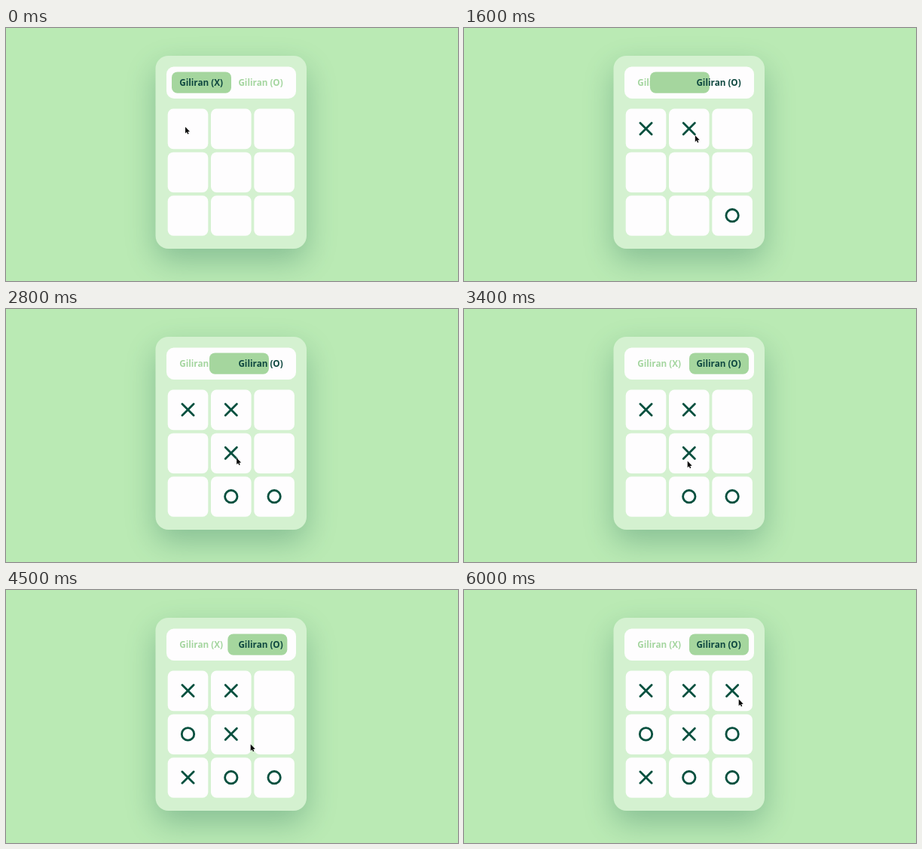
Animation, 600 px wide and 337 px high, one loop 6.1 s. Source, as an HTML page:

```html
<!DOCTYPE html>
<html lang="id">
<head>
<meta charset="utf-8">
<title>Giliran</title>
<style>
  html, body { margin: 0; width: 100%; height: 100%; overflow: hidden; background: #baeab4; }
  svg { display: block; width: 100%; height: 100%; }
  text { font: 700 11.7px "Open Sans", "Noto Sans", sans-serif; fill: #a5d6a0; }
  text.on { fill: #0f4840; }
  .mark { fill: none; stroke: #07503f; stroke-width: 2.8; stroke-linecap: round; }
  .white { fill: #fefdfe; }
</style>
</head>
<body>
<svg id="stage" viewBox="0 0 600 337">
  <defs>
    <filter id="blur" x="-50%" y="-50%" width="200%" height="200%">
      <feGaussianBlur stdDeviation="21"/>
    </filter>
  </defs>
  <rect width="600" height="337" fill="#baeab4"/>
  <rect x="198.5" y="53" width="200.5" height="257" rx="17" fill="#004d40" opacity=".28" filter="url(#blur)"/>
  <rect x="198.5" y="37" width="200.5" height="257" rx="17" fill="#d4f1d0"/>
  <rect class="white" x="213" y="51.5" width="172" height="42.5" rx="10"/>
  <g id="idle"></g>
  <rect id="slider" y="58.4" width="79" height="28.4" rx="7.5" fill="#a5d69e"/>
  <g id="active"></g>
  <g id="board"></g>
  <path id="cursor" d="M0 0V8.6L2 6.8 3.2 9.7 4.6 9.1 3.4 6.3 6 6.2Z" fill="#0b0b0b" stroke="#fff" stroke-width=".5" paint-order="stroke"/>
</svg>
<script>
const LOOP = 6100, STEP = 100, SLIDE = 300;

// [time, cell], X and O alternating
const moves = [[60, 0], [1050, 8], [1534, 1], [2251, 7], [2690, 4], [3700, 3], [4290, 6], [4850, 5], [5430, 2]];

// Where the pointer lingers between clicks: [time, x, y]
const hovers = [
  [0, 238, 131.7], [600, 305.7, 196.8], [800, 305.7, 196.8], [2300, 297.7, 208],
  [3400, 296.7, 202.6], [4500, 324.7, 205.6], [5800, 364.7, 145.6], [LOOP, 364.7, 145.6]
];

const center = i => [241.5 + (i % 3) * 57.3, 134.3 + Math.floor(i / 3) * 57.8];

const clicks = moves.map(([t, cell]) => {
  const [x, y] = center(cell);
  return [t, x + 8, y + 6];
});
const path = [...hovers, ...clicks].sort((a, b) => a[0] - b[0]);

const $ = id => document.getElementById(id);

function add(parent, tag, attrs, text) {
  const el = document.createElementNS(parent.namespaceURI, tag);
  for (const k in attrs) el.setAttribute(k, attrs[k]);
  if (text) el.textContent = text;
  return parent.appendChild(el);
}

const labels = (parent, cls) => ["X", "O"].map((s, i) =>
  add(parent, "text", { x: 230.2 + i * 78.2, y: 76.7, class: cls }, `Giliran (${s})`));
const idle = labels($("idle"), "");
const active = labels($("active"), "on");

for (let i = 0; i < 9; i++) {
  const [x, y] = center(i);
  add($("board"), "rect", { class: "white", x: x - 26.8, y: y - 26.7, width: 53.6, height: 53.6, rx: 7.5 });
}

const marks = moves.map(([, cell], i) => {
  const [x, y] = center(cell);
  return i % 2
    ? add($("board"), "circle", { class: "mark", cx: x, cy: y - .2, r: 8.2 })
    : add($("board"), "path", { class: "mark", d: `M${x - 7.6} ${y - 7.8}l15.2 15.2m0 -15.2l-15.2 15.2` });
});

// cubic-bezier(.25, .1, .25, 1)
function ease(p) {
  if (p >= 1) return 1;
  const curve = (a, b, u) => 3 * a * u * (1 - u) ** 2 + 3 * b * u * u * (1 - u) + u ** 3;
  let lo = 0, hi = 1;
  for (let i = 0; i < 24; i++) {
    const mid = (lo + hi) / 2;
    if (curve(.25, .25, mid) < p) lo = mid; else hi = mid;
  }
  return curve(.1, 1, lo);
}

function pointer(t) {
  const i = path.findIndex(k => k[0] > t);
  const [t0, x0, y0] = path[i - 1], [t1, x1, y1] = path[i];
  const p = (t - t0) / (t1 - t0), s = p * p * (3 - 2 * p);
  return [x0 + (x1 - x0) * s, y0 + (y1 - y0) * s];
}

const show = (el, on) => el.setAttribute("visibility", on ? "visible" : "hidden");

function draw(t) {
  const played = moves.filter(m => m[0] <= t).length;
  const turn = played % 2;
  const p = played ? ease((t - moves[played - 1][0]) / SLIDE) : 1;
  $("slider").setAttribute("x", 220 + 79 * (turn ? p : 1 - p));
  marks.forEach((m, i) => show(m, i < played));
  for (const i of [0, 1]) {
    show(idle[i], i !== turn);
    show(active[i], i === turn);
  }
  $("cursor").setAttribute("transform", `translate(${pointer(t)})`);
}

const start = performance.now();
function tick() {
  const t = (performance.now() - start) % LOOP;
  draw(Math.floor(t / STEP) * STEP);
  requestAnimationFrame(tick);
}
tick();
</script>
</body>
</html>
```
